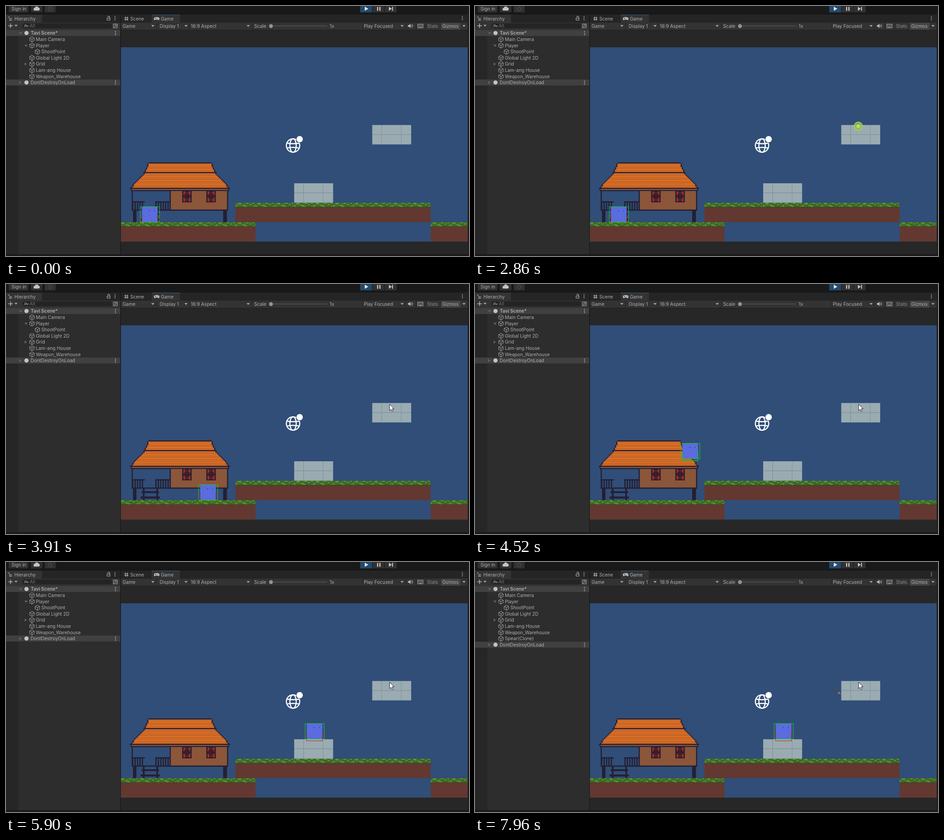
These frames come from a looping animation (1017x550 px, 8 s). An HTML page:

```html
<!DOCTYPE html>
<html lang="en">
<head>
<meta charset="utf-8">
<title>Game view</title>
<style>
html, body { margin: 0; width: 100%; height: 100%; overflow: hidden; background: #191919; }
svg { display: block; width: 1017px; height: 550px; }
text { font: 10.2px Inter, "Liberation Sans", sans-serif; fill: #b0b0b0; white-space: pre; }
</style>
</head>
<body>
<svg id="stage" viewBox="0 0 1017 550" xmlns="http://www.w3.org/2000/svg"></svg>
<script>
const LOOP = 8000;
const ROW = 13.6;
const SKY = '#304e78', INK = '#241f33', WALL = '#8b5639', DIRT = '#633830';

// Markup helpers
const rect = (x, y, w, h, fill, more = '') =>
  `<rect x="${x}" y="${y}" width="${w}" height="${h}" fill="${fill}" ${more}/>`;
const box = (x1, y1, x2, y2, fill) => rect(x1, y1, +(x2 - x1).toFixed(2), +(y2 - y1).toFixed(2), fill);
const line = (d, color, width = 1, more = '') =>
  `<path d="${d}" fill="none" stroke="${color}" stroke-width="${width}" ${more}/>`;
const shape = (d, fill) => `<path d="${d}" fill="${fill}"/>`;
const dot = (x, y, r, fill) => `<circle cx="${x}" cy="${y}" r="${r}" fill="${fill}"/>`;
const label = (x, mid, str, more = '') => `<text x="${x}" y="${mid + 3.6}" ${more}>${str}</text>`;
const group = (body, more = '') => `<g ${more}>${body}</g>`;
const caret = (x, y, color = '#a8a8a8') => shape(`M${x - 3.5} ${y - 1.5}h7l-3.5 3.8z`, color);
const fold = (x, y, open) =>
  shape(open ? `M${x - 3.5} ${y - 2}h7l-3.5 5z` : `M${x - 2} ${y - 3.5}v7l5-3.5z`, '#626262');
const menuDots = (x, y) => [-3.6, 0, 3.6].map(d => dot(x, y + d, 1, '#c0c0c0')).join('');
const cube = (x, y) => line(
  `M${x} ${y - 5.6}l5 2.8v5.6l-5 2.8l-5-2.8v-5.6zM${x - 5} ${y - 2.8}l5 2.8l5-2.8M${x} ${y}v5.6`,
  '#aaa', 1);

function random(seed) {
  return () => (seed = (seed * 16807) % 2147483647) / 2147483647;
}

function topBar() {
  const btn = '#313131';
  let spokes = '';
  for (let i = 0; i < 8; i++) {
    spokes += line('M0-2.4v-2.8', '#654a4a', 1.2, `transform="translate(97 6.5) rotate(${i * 45})"`);
  }
  return rect(0, 0, 1017, 550, '#191919')
    + rect(6, -4, 43, 18, btn, 'rx="2"') + label(12, 6, 'Sign in')
    + rect(55, -4, 25, 18, btn, 'rx="2"') + rect(85, -4, 24, 18, btn, 'rx="2"')
    + shape('M63.7 10a3 3 0 0 1-.3-6a4.3 4.3 0 0 1 7.8-.8a3.5 3.5 0 0 1 .5 6.8z', '#c4c4c4')
    + spokes
    + rect(778, -3, 26, 17, '#234a6d') + rect(805, -3, 26, 17, btn) + rect(832, -3, 26, 17, btn)
    + shape('M788 1.5v9l8-4.5z', '#e6e6e6')
    + box(815, 2, 817.6, 10.5, '#c4c4c4') + box(820, 2, 822.6, 10.5, '#c4c4c4')
    + shape('M841 1.8v8.6l6.5-4.3z', '#c4c4c4') + box(848, 1.8, 850, 10.4, '#c4c4c4');
}

function hierarchy() {
  const rows = [['Main Camera'], ['Player', 'open'], ['ShootPoint', '', 12], ['Global Light 2D'],
    ['Grid', 'shut'], ['Lam-ang House'], ['Weapon_Warehouse']];
  const header = (y) => rect(0, y - 6.8, 251, 13.2, '#404040')
    + dot(45, y - .2, 4.6, '#c4c4c4') + menuDots(240.5, y);
  let s = rect(0, 19, 251, 18, '#252525') + rect(0, 19, 79, 18, '#343434')
    + rect(0, 36.5, 251, 16.5, '#333') + rect(0, 53, 251, 493, '#2d2d2d')
    + rect(0, 53, 27, 493, '#262626')
    + line('M5 24.5h3M7 27.8h6M7 31h6', '#b4b4b4', 1.3) + label(18.5, 28, 'Hierarchy')
    + rect(222, 26.5, 6.5, 4.5, 'none', 'stroke="#b4b4b4" stroke-width="1.1"')
    + line('M227.5 26v-1.6a2 2 0 0 0-4 0', '#b4b4b4', 1.1) + menuDots(239.5, 27)
    + line('M5 43.5h10M10 38.5v10', '#b4b4b4', 1.5) + caret(22, 43)
    + rect(36, 38.2, 197, 11, '#242424', 'rx="4.5"')
    + `<circle cx="43" cy="43" r="2" fill="none" stroke="#aaa"/>` + line('M41.5 44.6l-2 2', '#aaa')
    + caret(47, 44.5, '#777') + label(52, 43.8, 'All', 'style="fill:#707070"')
    + rect(236, 39.5, 8.5, 8.5, 'none', 'stroke="#aaa"')
    + `<circle cx="241" cy="43" r="2" fill="none" stroke="#aaa"/>` + line('M239.5 44.5l-2.5 2.5', '#aaa')
    + header(59.7) + fold(32, 59.7, true)
    + label(54.5, 59.7, 'Tavi Scene*', 'style="font-weight:600"');
  rows.forEach(([name, state, indent = 0], i) => {
    const y = 59.7 + (i + 1) * ROW;
    s += cube(57 + indent, y) + label(65.5 + indent, y, name);
    if (state) s += fold(state === 'open' ? 44 : 43, y, state === 'open');
  });
  const last = 59.7 + 8 * ROW;
  s += group(cube(57, last) + label(65.5, last, 'Spear(Clone)'), 'id="spearRow"');
  s += group(header(last) + fold(31, last, false) + label(54, last, 'DontDestroyOnLoad'), 'id="keepRow"');
  return s;
}

function gameBars() {
  const seps = [330, 402, 540.5, 783, 877, 900, 921, 954].map(x => rect(x, 37, 1, 15.5, '#242424')).join('');
  let keys = '';
  for (let i = 0; i < 8; i++) keys += rect(906 + (i % 4) * 2.5, 41.5 + (i >> 2) * 2.3, 1.2, 1.2, '#b4b4b4');
  return rect(252.5, 19, 762, 18, '#252525') + rect(320, 19, 62, 18, '#333')
    + rect(320, 19, 62, 1, '#305880')
    + rect(252.5, 36.5, 762, 16.5, '#333') + rect(955, 37, 43, 15.5, '#454545')
    + line('M262.5 23.5v8.5M266.5 23.5v8.5M260 26h9M260 29.8h9', '#b8b8b8', 1.2)
    + label(273, 28, 'Scene')
    + shape('M328.5 24.5h5a3.6 3.6 0 0 1 3.3 5c-.8 2.3-2.4 2.2-3.8.3h-4c-1.4 1.9-3 2-3.8-.3a3.6 3.6 0 0 1 3.3-5z', '#c4c4c4')
    + line('M327 27.3h3.4M328.7 25.6v3.4', '#383838', .9) + dot(333.8, 27.3, .9, '#383838')
    + label(340, 28, 'Game') + menuDots(1002.5, 27)
    + seps
    + label(256, 44, 'Game') + caret(322.5, 43.6)
    + label(337.5, 44, 'Display 1') + caret(395.5, 43.6)
    + label(406, 44, '16:9 Aspect') + caret(532, 43.6)
    + label(545, 44, 'Scale') + rect(582, 43.3, 123, 1.3, '#585858') + dot(582, 44.2, 4.2, '#949494')
    + label(711, 44, '1x')
    + label(786, 44, 'Play Focused') + caret(870, 43.6)
    + shape('M883 42h2.3l3.2-2.8v9.2l-3.2-2.8h-2.3z', '#c0c0c0')
    + line('M890 41.5q1.8 2.3 0 4.6M892 40q3 3.8 0 7.6', '#c0c0c0', 1)
    + rect(904.5, 40, 11.5, 8, 'none', 'stroke="#b4b4b4"') + keys + rect(907.5, 46, 5.5, 1, '#b4b4b4')
    + label(925, 44, 'Stats', 'style="fill:#8c8c8c"') + label(958, 44, 'Gizmos') + caret(1006, 43.6)
    + rect(252.5, 53, 762, 493, '#272727') + rect(252.5, 52.5, 762, 1, '#1f1f1f')
    + box(252.5, 90.8, 1014, 518.2, SKY);
}

// One tile of grass, repeated along the ground.
function grassTile() {
  const rnd = random(77);
  const tile = 42.8;
  let s = rect(0, 0, tile, 10, '#3f6f28') + rect(0, 8.5, tile, 1.5, '#34481f');
  for (let i = 0; i < 30; i++) {
    const w = 1.5 + rnd() * 4;
    const color = ['#72b52f', '#5a9a2c', '#2f5a25'][i % 3];
    s += rect((rnd() * (tile - w)).toFixed(1), (rnd() * 7.2).toFixed(1), w.toFixed(1), 1.3, color);
  }
  return `<pattern id="grass" width="${tile}" height="42.7" x="247" y="433" patternUnits="userSpaceOnUse">${s}</pattern>`;
}

const ground = (x1, x2, y) => box(x1, y, x2, y + 42.5, DIRT) + rect(x1, y, x2 - x1, 10, 'url(#grass)');

function block(x, y) {
  const seam = '#82939a';
  return box(x, y, x + 85.5, y + 42.7, '#9aabb2')
    + rect(x + 20, y, 1.3, 42.7, seam) + rect(x + 63, y, 1.1, 42.7, seam)
    + rect(x, y + 20.2, 85.5, 1.4, seam);
}

function house() {
  const mid = 382.2, px = 2.67;
  const half = y => y < 366 ? 70 + (y - 344) * .42 : 79.5 + (y - 366) * .9;
  const snap = v => Math.round(v / px) * px;
  let s = '';
  for (let y = 344; y < 399; y += px) {
    const h = snap(half(y));
    s += box(mid - h, y, mid + h, y + px + .1, INK);
    if (y > 345) s += box(mid - h + px, y, mid + h - px, y + px + .1, '#de7025');
  }
  s += box(303, 365.3, 462, 367.8, INK) + box(272, 399.8, 492, 402.4, INK)
    + box(274, 402, 490, 407.3, INK) + box(276, 402.4, 488, 404.9, WALL)
    + box(361, 407, 487, 448, WALL)
    + box(276, 406, 278.5, 449, INK) + box(359.5, 406, 362, 449, INK) + box(485.5, 406, 488, 449, INK)
    + box(276, 447.7, 488, 450.4, INK)
    + box(279, 450, 286.5, 475.7, INK) + box(477, 450, 485.3, 475.7, INK);
  for (const [x1, x2] of [[277, 305], [328, 360]]) {
    s += box(x1, 429.5, x2, 432.2, INK);
    for (let x = x1; x < x2 - px; x += 2 * px) s += box(x, 430, x + px, 448, INK);
  }
  for (const x of [387, 440]) {
    s += box(x, 406, x + 20.8, 432, '#2b1d2b') + box(x + 7, 409, x + 14, 429, '#49282c');
    for (const dx of [2.7, 14.4]) {
      s += box(x + dx, 408, x + dx + 3.7, 416.5, '#b4282d')
        + box(x + dx, 421, x + dx + 3.7, 430, '#b4282d');
    }
    s += box(x + 5, 413, x + 16, 424, '#35202a');
  }
  return s + box(300.5, 450, 304.5, 475.7, INK) + box(330, 450, 334, 475.7, INK)
    + box(298, 456, 336, 460, INK) + box(295.5, 467.5, 338, 472, INK);
}

const globe = () => group(
  '<circle r="14.7"/><ellipse rx="7" ry="14.7"/><path d="M-13.5-5.5q13.5 3 27 0M-13.5 5.5q13.5-3 27 0"/>',
  'transform="translate(630.5 307)" fill="none" stroke="#fff" stroke-width="2.4"')
  + dot(645, 293, 8, SKY) + dot(645, 293, 7, '#fff');

// Player, its collider and its ground sensor, around the collider's top left corner.
const player = () => group(
  '<path id="sensor" fill="none" stroke-width="1.2"/>'
  + rect(4, .8, 34.5, 33.7, '#5a6cde')
  + rect(19.5, 8.7, 1.6, 1.6, '#2b3070') + rect(30.7, 8.7, 1.6, 1.6, '#2b3070')
  + '<path id="sides" fill="none" stroke-width="1.2" d="M4 18v16M38.5 18v16"/>'
  + rect(.5, .5, 42, 34, 'none', 'stroke="#17d01c" stroke-width="1"'), 'id="player"');

const spear = () => group(line('M-25 0H-4', '#6e3733', 1.5) + line('M-6-2.2L-3 0l-3 2.2M-4 0H0', '#a98a74', 1.6), 'id="spear"');
const cursor = () => group('<path d="M.6.6v14l3.2-3l2.2 5l2.4-1l-2.2-5h4.2z" fill="#fff" stroke="#222" stroke-width="1"/>', 'id="cursor"');
const click = () => group(dot(842, 264.3, 10, '#a6d63a') + dot(842, 264.3, 7.2, '#79bd72') + dot(842, 264.3, 4.2, '#d9dc4e'), 'id="click" opacity=".85"');

const stage = document.getElementById('stage');
stage.innerHTML = `<defs>${grassTile()}</defs>`
  + topBar() + hierarchy() + gameBars()
  + house() + ground(504, 932.5, 433) + ground(252.5, 548, 475.7) + ground(933, 1014, 475.7)
  + block(804.5, 261.8) + block(633, 390)
  + player() + spear() + globe() + click() + cursor()
  + rect(1014, 15, 3, 535, '#202020') + rect(0, 546, 1017, 4, '#1d191c');

const el = id => document.getElementById(id);
const show = (id, on) => el(id).setAttribute('display', on ? 'inline' : 'none');
const place = (id, x, y, turn = 0) =>
  el(id).setAttribute('transform', `translate(${x.toFixed(2)} ${y.toFixed(2)}) rotate(${turn.toFixed(2)})`);

// Linear interpolation through [time, value] points.
function track(points, t) {
  if (t <= points[0][0]) return points[0][1];
  for (let i = 1; i < points.length; i++) {
    const [t0, a] = points[i - 1], [t1, b] = points[i];
    if (t <= t1) return a + (b - a) * (t - t0) / (t1 - t0);
  }
  return points[points.length - 1][1];
}

const bursts = [0, 260, 2860, 4310, 5760, 6430, 6770];
function step(t) {
  const start = bursts.filter(b => b <= t).pop();
  return start ? start + Math.floor((t - start) / 70) * 70 : 0;
}

const walk = [[3575, 294.5], [3910, 422.5], [4445, 422.5], [4870, 586.5], [5010, 641], [5080, 658],
  [5150, 662], [5360, 651], [5760, 651], [5900, 656.5]];
const arc = (top, peak, t) => top + .00136 * (t - peak) ** 2;

function height(t) {
  if (t < 4348) return 441;
  if (t < 4690) return Math.min(441, arc(334, 4629, t));
  if (t < 6430) return Math.min(355, arc(257, 4936, t));
  return Math.min(355, arc(248, 6711, t));
}

// Tip position and angle of the thrown spear, or null when there is none.
function spearPose(t) {
  const deg = (vy, vx) => Math.atan2(vy, vx) * 180 / Math.PI;
  if (t >= 2930 && t < 3600) {
    const d = Math.min(t - 2930, 350);
    return [345 + .65 * d, 452 - .245 * d + .0006 * d * d, deg(.0012 * d - .245, .65)];
  }
  if (t >= 6700 && t < 6840) {
    const d = t - 6770;
    return [757 + .66 * d, 267 + .055 * d + .0006 * d * d, deg(.055 + .0012 * d, .66)];
  }
  if (t >= 6840) {
    return [803, track([[6840, 274], [7190, 283], [7960, 290]], t), track([[6840, 10], [7190, 26.5]], t)];
  }
  return null;
}

function draw(time) {
  const t = step(time);
  const x = track(walk, t), y = height(t);
  const low = y >= 441, grounded = low || y >= 355 && t > 5150;
  place('player', x, y);
  const tint = grounded ? '#c8202c' : '#17d01c';
  el('sensor').setAttribute('stroke', tint);
  el('sides').setAttribute('stroke', tint);
  el('sensor').setAttribute('d', low ? 'M4 34v4.5M38.5 34v4.5' : 'M4 34v4.5h34.5v-4.5');

  const pose = spearPose(t);
  show('spear', pose);
  if (pose) place('spear', ...pose);

  const listed = t >= 3000 && t < 3770 || t >= 6840;
  show('spearRow', listed);
  place('keepRow', 0, listed ? ROW : 0);

  const pressed = t >= 2860 && t < 3000 || t >= 6570 && t < 6710;
  show('click', pressed);
  show('cursor', t >= 260 && !pressed);
  place('cursor', track([[260, 923], [470, 842]], t), track([[260, 480], [470, 264]], t));
}

const begin = performance.now();
function tick() {
  draw((performance.now() - begin) % LOOP);
  requestAnimationFrame(tick);
}
tick();
</script>
</body>
</html>
```
